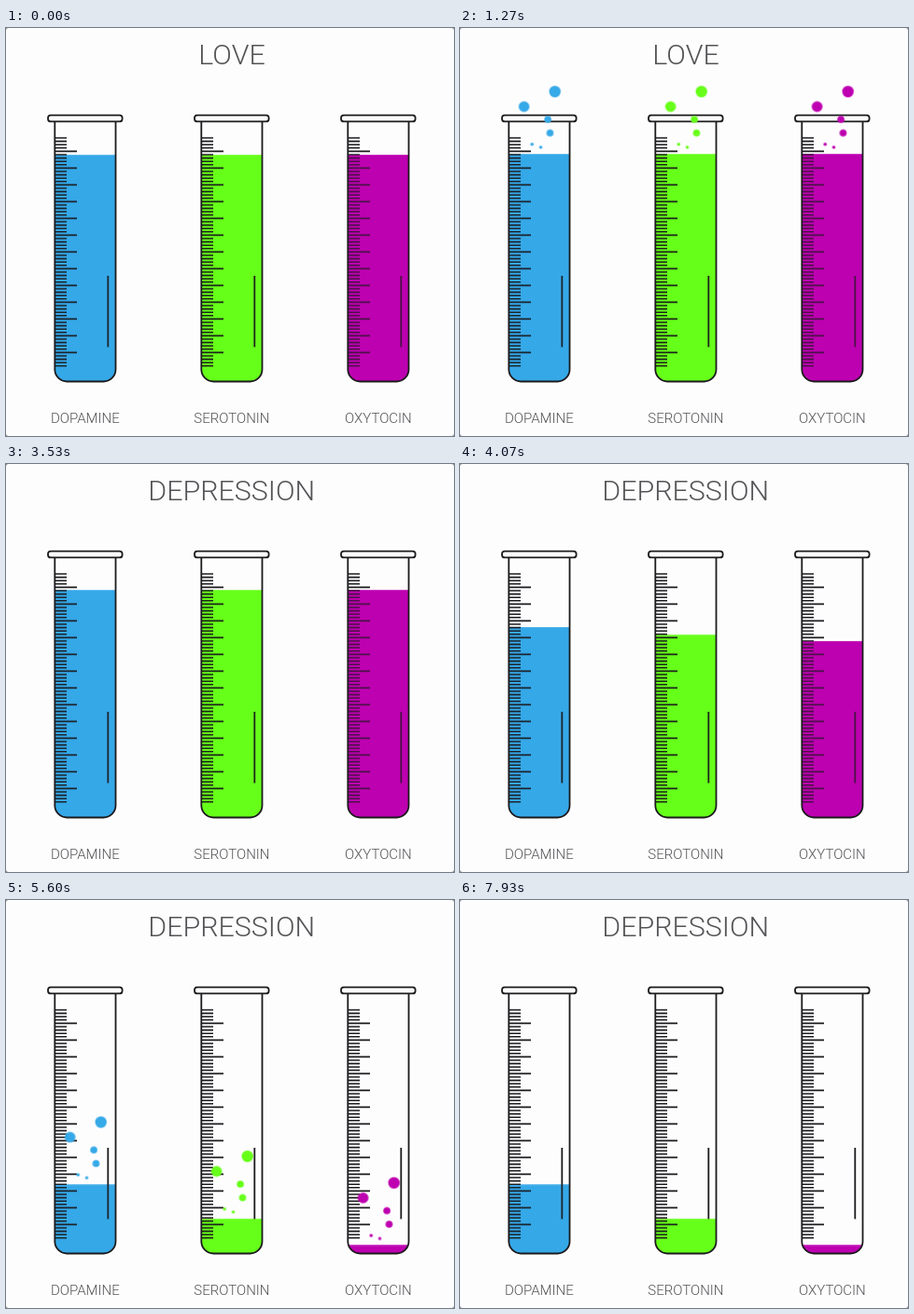
An HTML page for the animation above (8000 ms loop, 480 px wide and 438 px high).

```html
<!DOCTYPE html>
<html lang="en">
<head>
<meta charset="utf-8">
<title>Love and depression</title>
<style>
  html, body { margin: 0; width: 100%; height: 100%; overflow: hidden; background: #8c8c8c; }
  svg { display: block; width: 100vw; height: 100vh; }
  text { font-family: Roboto, "Liberation Sans", sans-serif; font-weight: 300; fill: #535456; text-anchor: middle; }
  .title { font-size: 30.4px; animation: first 8s step-end infinite; }
  .title.second { animation-name: second; }
  .label { font-size: 15px; }
  .ink { fill: none; stroke: #1b1a1c; stroke-width: 1.8; }
  .level { animation: level 8s linear infinite; }
  .float { animation: float 8s linear infinite; }
  .grow { animation: grow 8s linear infinite; }

  @keyframes first { 0% { opacity: 1; } 44.1%, 100% { opacity: 0; } }
  @keyframes second { 0% { opacity: 0; } 44.1%, 100% { opacity: 1; } }

  @keyframes level {
    0% { transform: translateY(.7px); }
    5% { transform: translateY(0); }
    45.375% { transform: translateY(0); animation-timing-function: cubic-bezier(.37, 0, .63, 1); }
    62.5%, 100% { transform: translateY(var(--drop)); }
  }

  /* one burst per mood: fast start, slow drift, fade */
  @keyframes float {
    0%, 7%, 61.125% { transform: translate(0, 0); animation-timing-function: cubic-bezier(.2, .56, .5, .896); }
    23.25%, 61.12%, 77.375%, 100% { transform: translate(var(--dx), var(--dy)); }
  }
  @keyframes grow {
    0%, 7%, 61.125% { transform: scale(0); opacity: 1; animation-timing-function: cubic-bezier(.15, .75, .4, 1); }
    13.25%, 20.5%, 67.375%, 74.625% { transform: scale(1); opacity: 1; }
    23.5%, 61.12%, 77.625%, 100% { transform: scale(1); opacity: 0; }
  }
</style>
</head>
<body>
<svg viewBox="0 0 480 438" preserveAspectRatio="none">
  <defs>
    <clipPath id="glass"><path d="M52.3 98V366.5a13 13 0 0 0 13 13h39.2a13 13 0 0 0 13-13V98z"/></clipPath>
  </defs>
  <rect width="480" height="438" rx="3" fill="#fefdfe"/>
  <text class="title" x="242" y="39.3">LOVE</text>
  <text class="title second" x="241.7" y="39.3">DEPRESSION</text>
  <g id="tubes"></g>
</svg>
<script>
  const TOP = 135.3;
  const tubes = [
    { name: "DOPAMINE", color: "#36a9e8", drop: 170.2, veil: .08 },
    { name: "SEROTONIN", color: "#67ff1a", drop: 206.9, veil: .05 },
    { name: "OXYTOCIN", color: "#be00b0", drop: 235.4, veil: .3 }
  ];
  // start x, sideways drift, rise, radius
  const bubbles = [
    [89.2, 15.4, 83, 6.2],
    [81.3, -15.7, 63, 5.8],
    [92, 2.6, 46, 3.8],
    [90, 8, 28, 3.8],
    [74, 4, 13, 1.8],
    [86.5, 0, 9, 1.7]
  ];

  const tick = i => {
    const y = (118 + i * 3.6).toFixed(1);
    return `M52.3 ${y}H${i % 5 === 4 ? 76 : 65}`;
  };
  const ticks = Array.from({ length: 69 }, (_, i) => tick(i)).join("");

  const liquid = (t, opacity) =>
    `<g clip-path="url(#glass)"><rect class="level" x="50" y="${TOP}" width="70" height="260"
      fill="${t.color}" opacity="${opacity}"/></g>`;

  const bubble = ([x, dx, rise, r]) =>
    `<g transform="translate(${x} ${TOP})"><g class="float" style="--dx:${dx}px;--dy:${-rise}px">
      <circle class="grow" r="${r}"/></g></g>`;

  const tube = (t, i) =>
    `<g transform="translate(${i * 157} 0)" style="--drop:${t.drop}px">
      ${liquid(t, 1)}
      <path class="ink" style="stroke-width:1.6" d="${ticks}"/>
      <path class="ink" d="M109.3 266V342.5"/>
      ${liquid(t, t.veil)}
      <path class="ink" d="M52.3 100V366.5a13 13 0 0 0 13 13h39.2a13 13 0 0 0 13-13V100"/>
      <rect class="ink" style="fill:#fefdfe" x="45" y="93.6" width="79.6" height="6.8" rx="3"/>
      <g class="level" fill="${t.color}">${bubbles.map(bubble).join("")}</g>
      <text class="label" x="84.9" y="424">${t.name}</text>
    </g>`;

  document.getElementById("tubes").innerHTML = tubes.map(tube).join("");
</script>
</body>
</html>
```
